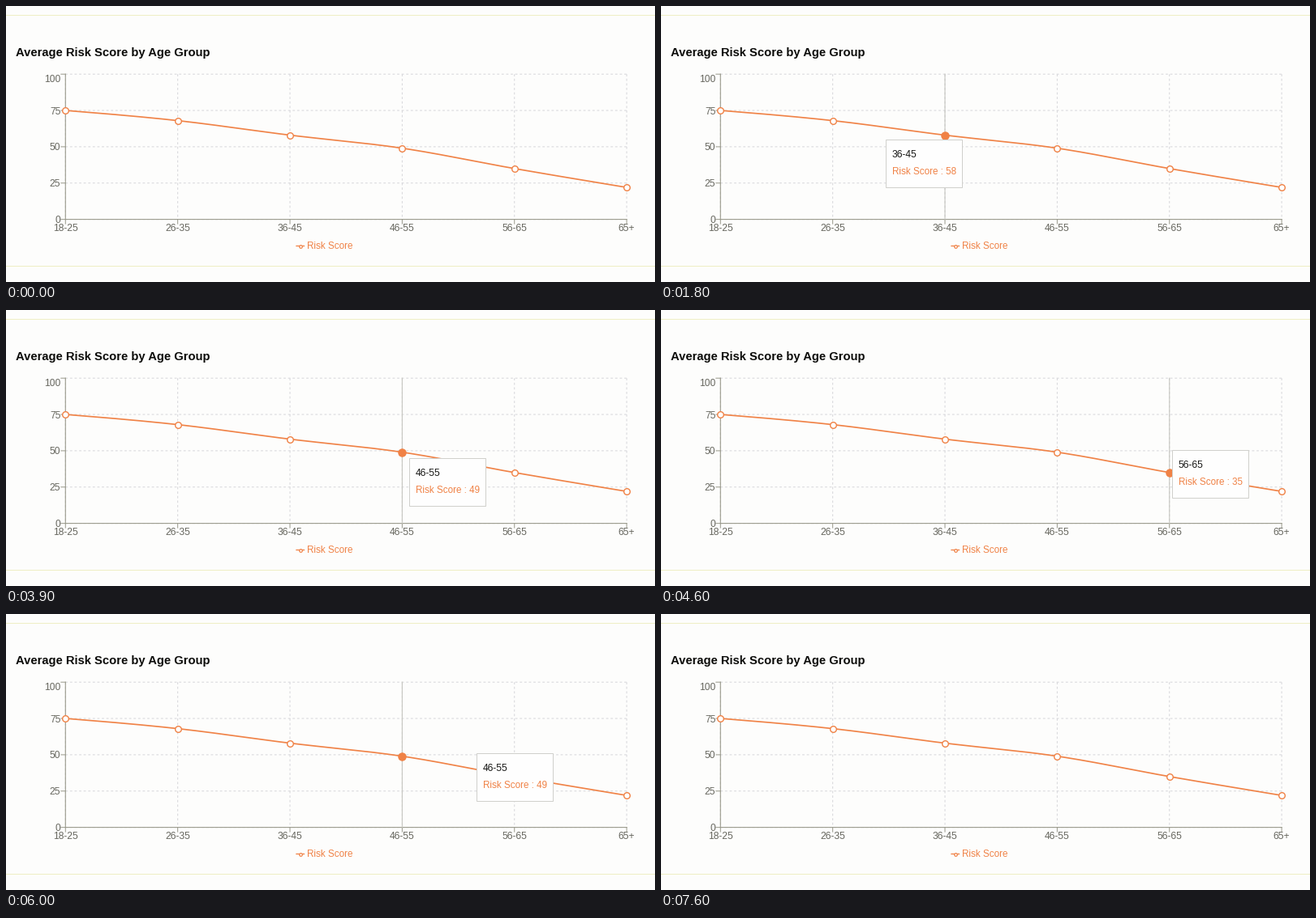
These frames come from a looping animation (800 by 341 pixels, 8.1 s). A matplotlib script:

```python
import numpy as np
import matplotlib.pyplot as plt
from matplotlib.animation import FuncAnimation
from matplotlib.patches import Rectangle

W, H, DPI = 800, 341, 100
STEP, LOOP = 100, 8100

PAPER = "#fdfdfc"
ORANGE = "#f08246"
AXIS = "#9a9a8c"
GRID = "#d6d6da"
CURSOR = "#c6c6c0"
INK = "#66665e"

GROUPS = ["18-25", "26-35", "36-45", "46-55", "56-65", "65+"]
SCORES = np.array([75, 68, 58, 49, 35, 22])
LEFT, RIGHT, TOP, BOTTOM = 73.3, 765.1, 84.2, 263.6
XS = np.linspace(LEFT, RIGHT, len(GROUPS))
BOX_W, BOX_H, GAP = 94, 59, 8.7

# (time in ms, hovered group); None hides the tooltip
HOVER = [(0, None), (400, 0), (700, 1), (1700, 2), (3100, 3), (4300, 4),
         (4800, 5), (5600, 4), (5900, 3), (7600, None)]
# (time in ms, top of the tooltip)
TOPS = [(400, 146), (1100, 156), (2600, 177), (2900, 177), (3600, 185),
        (3900, 184), (4700, 172), (5200, 162), (5400, 162), (6200, 177),
        (6700, 183), (7500, 195)]
GLIDE = 400


def y_of(score):
    return BOTTOM - score * (BOTTOM - TOP) / 100


def monotone(xs, ys, n=30):
    """Smooth curve through evenly spaced points, as cubic Hermite pieces."""
    h = xs[1] - xs[0]
    slope = np.diff(ys) / h
    m = np.gradient(ys, h)
    m[0] = (3 * slope[0] - m[1]) / 2
    m[-1] = (3 * slope[-1] - m[-2]) / 2
    t = np.linspace(0, 1, n, endpoint=False)
    y = [(2 * t**3 - 3 * t**2 + 1) * ys[i] + (t**3 - 2 * t**2 + t) * h * m[i]
         + (3 * t**2 - 2 * t**3) * ys[i + 1] + (t**3 - t**2) * h * m[i + 1]
         for i in range(len(slope))]
    x = [xs[i] + t * h for i in range(len(slope))]
    return np.append(x, xs[-1]), np.append(y, ys[-1])


def px(size):
    return size * 72 / DPI


def css_ease(p):
    """cubic-bezier(.25, .1, .25, 1)"""
    u = np.linspace(0, 1, 101)
    x = 0.75 * u * (1 - u)**2 + 0.75 * u**2 * (1 - u) + u**3
    y = 0.3 * u * (1 - u)**2 + 3 * u**2 * (1 - u) + u**3
    return np.interp(p, x, y)


fig = plt.figure(figsize=(W / DPI, H / DPI), dpi=DPI, facecolor=PAPER)
ax = fig.add_axes([0, 0, 1, 1])
ax.set_xlim(0, W)
ax.set_ylim(H, 0)
ax.axis("off")


def line(x, y, color, width=1, z=1, **kw):
    return ax.plot(x, y, color=color, lw=px(width), zorder=z, snap=False, **kw)[0]


def text(x, y, s, size, color, z=5, **kw):
    return ax.text(x, y, s, fontsize=px(size), color=color, zorder=z,
                   family="Liberation Sans", va="baseline", **kw)


def dot(x, y, size, face, width, z):
    return ax.plot([x], [y], "o", ms=px(size), mfc=face, mec=ORANGE,
                   mew=px(width), zorder=z, snap=False)[0]


# Card edges and title
for y in (11.5, 321.5):
    line([0, W], [y, y], "#efefc4")
text(12, 62.3, "Average Risk Score by Age Group", 14.8, "#0c0c0a", weight="bold")

# Grid, axes and tick labels
dash = dict(ls=(0, (2.8, 2.8)), dash_capstyle="butt")
for score in range(0, 101, 25):
    y = y_of(score)
    line([LEFT, RIGHT], [y, y], GRID, **dash)
    line([LEFT - 5.5, LEFT], [y, y], AXIS, z=2)
    text(67.3, y + (9.5 if score == 100 else 4.5), str(score), 12, INK, ha="right")
for x, group in zip(XS, GROUPS):
    line([x, x], [TOP, BOTTOM], GRID, **dash)
    line([x, x], [BOTTOM, BOTTOM + 5.5], AXIS, z=2)
    text(x, 278.2, group, 12, INK, ha="center")
line([LEFT, LEFT], [TOP, BOTTOM], AXIS, 1.1, 2)
line([LEFT, RIGHT], [BOTTOM, BOTTOM], AXIS, 1.1, 2)

# Score curve
YS = y_of(SCORES)
line(*monotone(XS, YS), ORANGE, 1.7, 4)
for x, y in zip(XS, YS):
    dot(x, y, 7.6, "white", 1.4, 5)

# Legend
line([358, 367.5], [296.5, 296.5], ORANGE, 1.3, 4)
dot(362.7, 296.5, 3.6, "white", 1.2, 5)
text(371, 300.5, "Risk Score", 11.65, ORANGE)

# Hover parts
cursor = line([0, 0], [TOP, BOTTOM], CURSOR, 1.1, 3)
active = dot(0, 0, 9.4, ORANGE, 1, 6)
box = Rectangle((0, 0), BOX_W, BOX_H, fc="#fefefe", ec="#d0d0cc", lw=px(1),
                zorder=7, snap=False)
ax.add_patch(box)
label = text(0, 0, "", 12, "#161614", 8)
value = text(0, 0, "", 11.65, ORANGE, 8)
hover = [cursor, active, box, label, value]


def box_x(i):
    x = XS[i] + GAP
    return x if x + BOX_W < 777 else XS[i] - GAP - BOX_W


def tip_x(t):
    """Each new group starts a glide from wherever the box is."""
    start = goal = None
    since = 0
    for when, i in HOVER:
        if when > t or i is None:
            continue
        if goal is None:
            start = box_x(i)
        else:
            start += (goal - start) * css_ease(min(1, (when - since) / GLIDE))
        goal, since = box_x(i), when
    return start + (goal - start) * css_ease(min(1, (t - since) / GLIDE))


def draw(k):
    t = k * STEP
    i = [group for when, group in HOVER if when <= t][-1]
    for part in hover:
        part.set_visible(i is not None)
    if i is None:
        return hover
    x = round(tip_x(t)) + 0.5
    y = round(np.interp(t, *zip(*TOPS))) - 0.5
    cursor.set_xdata([XS[i], XS[i]])
    active.set_data([XS[i]], [YS[i]])
    box.set_xy((x, y))
    label.set_position((x + 7.2, y + 21.8))
    label.set_text(GROUPS[i])
    value.set_position((x + 7.2, y + 42.8))
    value.set_text(f"Risk Score : {SCORES[i]}")
    return hover


anim = FuncAnimation(fig, draw, frames=LOOP // STEP, interval=STEP,
                     repeat=True, repeat_delay=0, blit=False)
plt.show()
```
